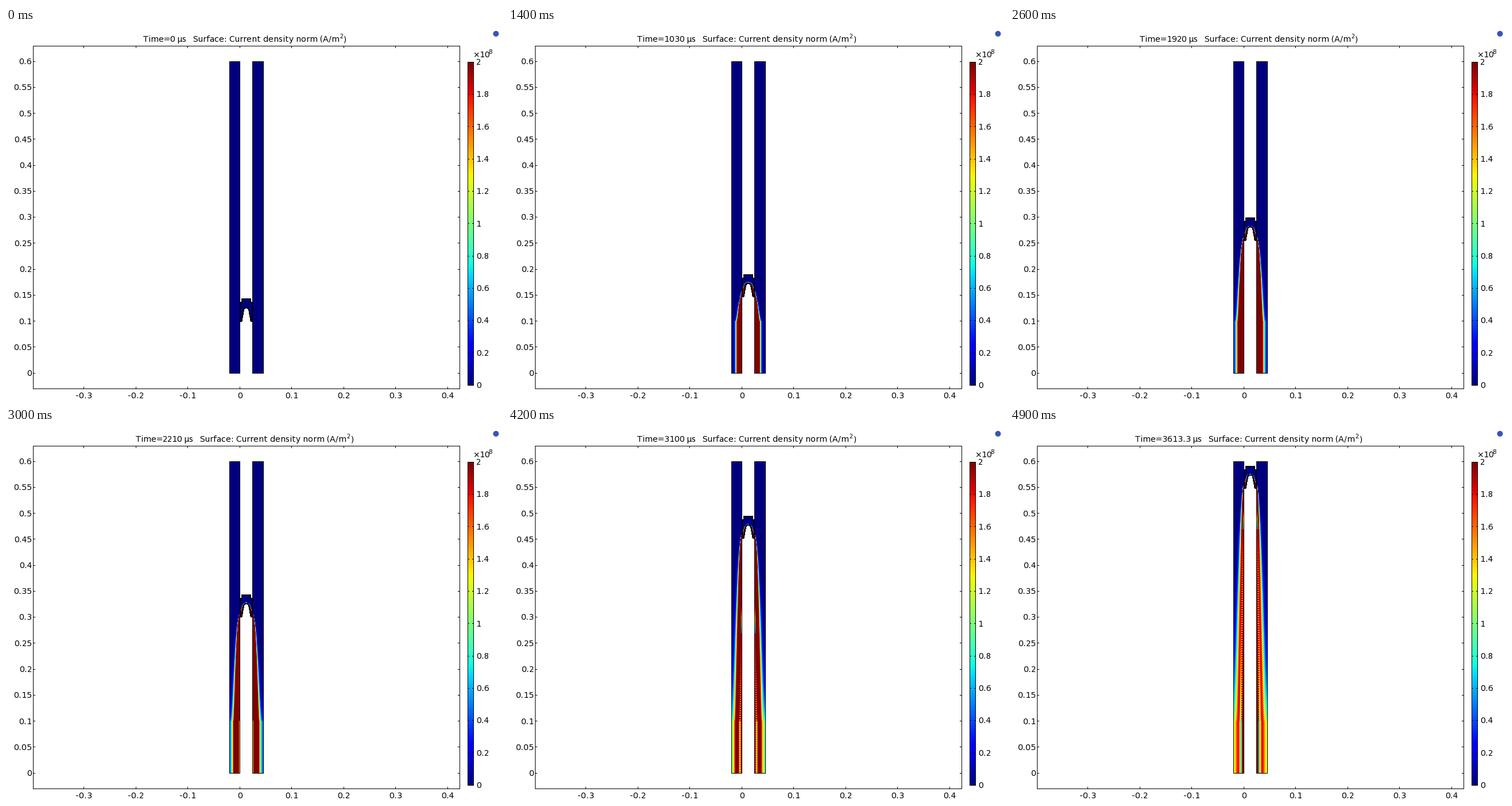
Write a matplotlib script that moves like this. It is 864 by 648 pixels and loops after 5000 ms.

```python
import numpy as np
import matplotlib.pyplot as plt
from matplotlib.animation import FuncAnimation
from matplotlib.patches import Circle, Polygon, Rectangle

WIDTH, HEIGHT = 864, 648
FRAMES, INTERVAL = 50, 100
T_END = 3613.3                       # microseconds
T_LAST = 1.05 * T_END                # latest contact time considered
SCALE, X0, Y0 = 905, 407.3, 601.2    # pixels per metre and plot origin
TOP = Y0 - 0.6 * SCALE
RAIL, HALF_GAP = 18.1, 11.31
CENTER = X0 + HALF_GAP
TAIL_START = Y0 - 0.1 * SCALE
CELLS, GAP_CELLS, ROWS = 36, 45, 1086
DX = RAIL / CELLS
DIFFUSION = 0.0109                   # square pixels per microsecond
SUBSTEPS, STARTS = 8, 120

# Whole-pixel lines and glyph advances give the crisp plotted look
plt.rcParams.update({"font.family": "DejaVu Sans", "font.size": 13.5,
                     "text.hinting_factor": 1, "path.snap": False})


def travel(t):
    """Armature displacement in pixels."""
    tau = 1551
    s = np.maximum(t - 124, 0)
    return 0.193 * (s - tau * (1 - np.exp(-s / tau)))


def current(t):
    """Driving current: quick rise, then a quarter cosine."""
    return 62 * min(t / 120, 1) * np.cos(np.pi / 2 * t / 3900)


def diffuse():
    """Rail current density for each frame, contact time and depth."""
    starts = np.linspace(0, T_LAST, STARTS)
    field = np.zeros((STARTS, CELLS + 1))
    dt = T_END / (FRAMES - 1) / SUBSTEPS
    ratio = DIFFUSION * dt / DX**2
    result = [np.zeros((STARTS, CELLS))]
    for step in range(1, (FRAMES - 1) * SUBSTEPS + 1):
        t = step * dt
        field[:, 0] = np.where(t >= starts, current(t), 0)
        field[:, 1:-1] += ratio * np.diff(field, 2, axis=1)
        if step % SUBSTEPS == 0:
            result.append(-np.diff(field, axis=1) / DX)
    return np.array(result)


density = diffuse()
row_y = TOP + (np.arange(ROWS) + 0.5) * (Y0 - TOP) / ROWS
columns = 2 * CELLS + GAP_CELLS
half_width = columns * DX / 2
offset = np.abs((np.arange(columns) + 0.5) * DX - half_width)[None, :]
depth = ((np.arange(CELLS) + 0.5) * DX)[None, :]

# Moment at which the armature tail passes each row
clock = np.linspace(0, T_LAST, 2000)
contact = np.interp(np.maximum(TAIL_START - row_y, 0),
                    travel(clock) + 1e-6 * clock, clock)
slot = contact / T_LAST * (STARTS - 1)
low = np.minimum(slot.astype(int), STARTS - 2)
mix = (slot - low)[:, None]
crowding = 1 + 0.35 * contact[:, None] / T_END

# Coarse sampling hides the reversal line except for a row of dots
plain = np.where(contact > 0, 1.9, 1.5)
dotted = np.where(row_y.astype(int) % 4 == 0, 0.9, plain)[:, None]
floor = np.where(depth < 1.3, 2, dotted)


def rail_density(frame):
    bank = density[frame]
    j = (bank[low] * (1 - mix) + bank[low + 1] * mix) * crowding
    reversal = (j[:, :1] < 0) & (depth < 4.5)
    return np.where(reversal, np.maximum(np.abs(j), floor), np.abs(j))


def armature_density(t, tail):
    """Thin current layer that follows the arch and the contact zone."""
    h = (tail - row_y)[:, None]
    leg = offset - (8.2 - 3.4 * np.clip(h, 0, 18.5) / 18.5)
    dist = np.where(h > 18.5, np.hypot(offset, h - 18.5) - 4.8, leg)
    growth, fade = min(1, np.sqrt(t / 440)), np.exp(-t / 700)
    at_tail = (3.6 + 8.2 * fade) * growth
    at_apex = (0.8 + 4.1 * fade) * growth
    layer = at_tail + (at_apex - at_tail) * np.clip(h / 23.5, 0, 1)**1.5
    j = np.exp(np.clip((layer - dist) / (0.3 + 0.06 * layer), -20, 3))
    return np.where((h > -30) & (h < 38), j, 0) * min(1, t / 60)


def surface(frame, t, tail):
    rail = rail_density(frame)
    gap = np.zeros((ROWS, GAP_CELLS))
    whole = np.hstack([rail[:, ::-1], gap, rail])
    return np.maximum(whole, armature_density(t, tail))


def arch(tail):
    a = np.linspace(np.pi, 0, 25)
    curve = np.column_stack([CENTER + 4.8 * np.cos(a),
                             tail - 18.5 - 4.8 * np.sin(a)])
    return [(CENTER - 8.2, tail), *curve, (CENTER + 8.2, tail)]


def crown(tail, edge):
    shoulder, top = tail - 32.5, tail - 38.5
    return [(CENTER + edge, shoulder), (CENTER + 7.5, shoulder),
            (CENTER + 7.5, top), (CENTER - 7.5, top),
            (CENTER - 7.5, shoulder), (CENTER - edge, shoulder)]


fig = plt.figure(figsize=(WIDTH / 72, HEIGHT / 72), dpi=72, facecolor="white")
ax = fig.add_axes([0, 0, 1, 1])
ax.axis("off")


def pixel(v):
    return np.floor(v) + 0.5


def line(xs, ys):
    ax.plot(pixel(xs), pixel(ys), color="black", lw=1, antialiased=False,
            solid_capstyle="projecting")


def box(left, top, right, bottom):
    x, y = pixel(left), pixel(top)
    ax.add_patch(Rectangle((x, y), pixel(right) - x, pixel(bottom) - y,
                           fill=False, lw=1, antialiased=False, zorder=5))


def draw_frame_and_scales():
    left, top, right, bottom = 47, 31, 790, 628
    box(left, top, right, bottom)
    for i in range(13):
        y = Y0 - i * 0.05 * SCALE
        line([left, left + 3], [y, y])
        line([right - 3, right], [y, y])
        ax.text(45, y + 4.8, f"{i * 0.05:.2g}", ha="right")
    for i in range(-3, 5):
        x = X0 + i * 0.1 * SCALE
        line([x, x], [top, top + 3])
        line([x, x], [bottom - 3, bottom])
        ax.text(x, 645, f"{i / 10:g}", ha="center")

    ax.imshow(np.linspace(2, 0, 512)[:, None], cmap="jet", vmin=0, vmax=2,
              extent=(804.5, 814.5, 622.5, 59.5), aspect="auto")
    box(804, 59, 814, 622)
    for i in range(11):
        y = 622.3 - i * 56.3
        line([804, 806], [y, y])
        line([812, 814], [y, y])
        ax.text(819, y + 4.8, f"{i * 0.2:.2g}", ha="left")
    ax.text(813, 51, "×10", ha="left")
    ax.text(841, 45, "8", ha="left", size=9.5)
    ax.add_patch(Circle((853.5, 10), 5, color="#3557b4", lw=0))


draw_frame_and_scales()
image = ax.imshow(np.zeros((ROWS, columns)), cmap="jet", vmin=0, vmax=2,
                  extent=(CENTER - half_width, CENTER + half_width, Y0, TOP),
                  aspect="auto", interpolation="bilinear", zorder=3)
blank = [(0, 0)] * 3
above = ax.add_patch(Polygon(blank, fc="white", lw=0, zorder=4))
below = ax.add_patch(Polygon(blank, fc="white", lw=0, zorder=4))
outline = ax.add_patch(Polygon(blank, fill=False, lw=1, antialiased=False,
                               zorder=5))
box(X0 - RAIL, TOP, X0, Y0)
box(CENTER + HALF_GAP, TOP, CENTER + HALF_GAP + RAIL, Y0)

title = ax.text(409.8, 24, "", ha="center")
for text, shift, size in (("2", (0.5, 6), 9.5), (")", (6.5, 0), 13.5)):
    ax.annotate(text, (1, 24), xycoords=(title, "data"), xytext=shift,
                textcoords="offset points", size=size, annotation_clip=False)
ax.set(xlim=(0, WIDTH), ylim=(HEIGHT, 0))


def update(frame):
    t = T_END * frame / (FRAMES - 1)
    tail = TAIL_START - travel(t)
    image.set_data(surface(frame, t, tail))
    l, r = CENTER - HALF_GAP, CENTER + HALF_GAP
    above.set_xy([(l, TOP - 2), (r, TOP - 2), *crown(tail, HALF_GAP)])
    below.set_xy([(l, Y0 + 2), (l, tail), *arch(tail), (r, tail), (r, Y0 + 2)])
    outline.set_xy([(CENTER - 10.6, tail), *arch(tail), (CENTER + 10.6, tail),
                    *crown(tail, 10.6)])
    shown = f"{t:.1f}" if frame == FRAMES - 1 else f"{round(t / 10) * 10}"
    title.set_text(f"Time={shown} µs   Surface: Current density norm (A/m")
    return image, above, below, outline, title


animation = FuncAnimation(fig, update, frames=FRAMES, interval=INTERVAL,
                          repeat=True, repeat_delay=0, blit=False)
plt.show()
```
